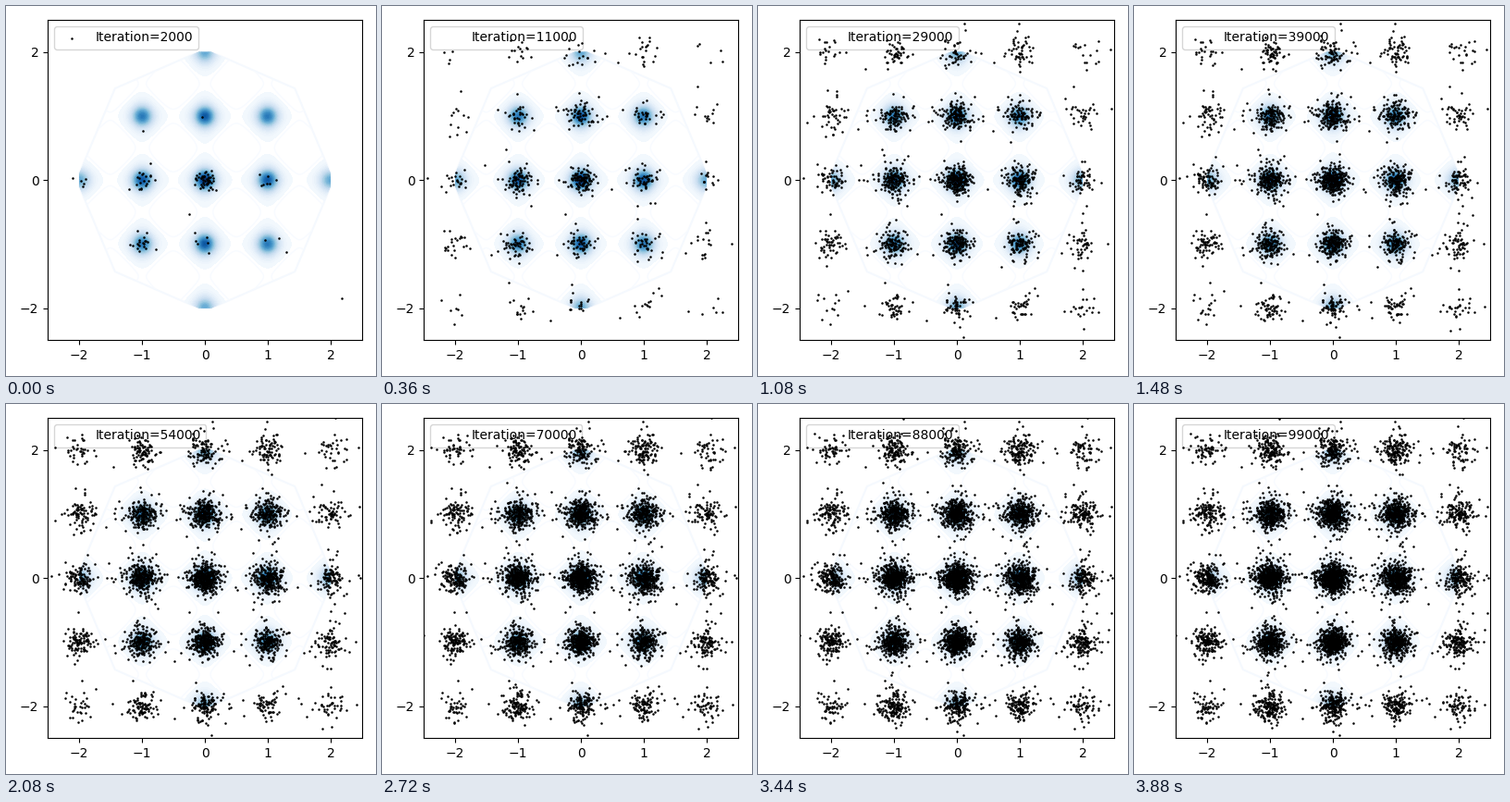
These frames come from a looping animation (400 px wide and 400 px high, 3920 ms). A matplotlib script:

```python
import numpy as np
import matplotlib.pyplot as plt
from matplotlib.animation import FuncAnimation
from matplotlib.patches import Polygon

FRAMES, INTERVAL = 98, 40
PER_FRAME = 70
KAPPA = 2.2
rng = np.random.default_rng(11)


def cluster(x, y, n, spread=0.1):
    return rng.normal((x, y), spread, (n, 2))


def wells(n):
    """Samples around the integer grid, thinning out from the centre."""
    steps = np.arange(-2, 3)
    weights = np.exp(-steps**2 / 3.3)
    centres = rng.choice(steps, (n, 2), p=weights / weights.sum())
    return centres + rng.vonmises(0, KAPPA, (n, 2)) / (2 * np.pi)


def density(x, y):
    wave = np.cos(2 * np.pi * x) + np.cos(2 * np.pi * y) - 2
    return np.exp(KAPPA * wave - (x**2 + y**2) / 6)


def outline(tip=2, blunt=0.1, diagonal=1.43):
    """Octagon whose four axis corners are cut flat."""
    points = []
    for turn in np.arange(4) * np.pi / 2:
        c, s = np.cos(turn), np.sin(turn)
        for x, y in ((tip, -blunt), (tip, blunt), (diagonal, diagonal)):
            points.append((c * x - s * y, s * x + c * y))
    return points


start = np.vstack([
    cluster(0, 0, 50, 0.085),
    cluster(-1, 0, 20), cluster(-1, -1, 20),
    cluster(1, 0, 7), cluster(0, -1, 6), cluster(-2, 0, 5),
    cluster(1, -1, 2), cluster(0, 1, 1), cluster(-1, 1, 1),
    rng.uniform((-2, -2), (2.3, 0), (3, 2)),
])
samples = np.vstack([start, wells(PER_FRAME * (FRAMES - 1))])

fig, ax = plt.subplots(figsize=(4, 4), dpi=100)
ax.set(xlim=(-2.5, 2.5), ylim=(-2.5, 2.5),
       xticks=range(-2, 3), yticks=(-2, 0, 2))
fig.tight_layout()

edge = Polygon(outline(), fill=False, edgecolor="#f5f9fe", linewidth=1.5)
ax.add_patch(edge)

grid = np.linspace(-2.05, 2.05, 247)
gx, gy = np.meshgrid(grid, grid)
z = density(gx, gy)
fill = ax.contourf(gx, gy, z, levels=np.linspace(0.015, 1, 45),
                   cmap="Blues", vmin=0, vmax=1)
rings = ax.contour(gx, gy, z, levels=[0.006],
                   colors="#f8fbff", linewidths=1)
for part in (fill, rings):
    part.set_clip_path(edge)

dots = ax.scatter(start[:, 0], start[:, 1], s=3.3, c="black",
                  linewidths=0, zorder=6, label="Iteration=2000")
legend = ax.legend(loc="upper left")
label = legend.get_texts()[0]
handle = legend.legend_handles[0]


def update(i):
    dots.set_offsets(samples[:len(start) + PER_FRAME * i])
    label.set_text(f"Iteration={2000 + 1000 * i}")
    handle.set_visible(i == 0)
    return dots, legend


anim = FuncAnimation(fig, update, frames=FRAMES, interval=INTERVAL,
                     init_func=lambda: update(0), repeat=True, repeat_delay=0)
plt.show()
```
